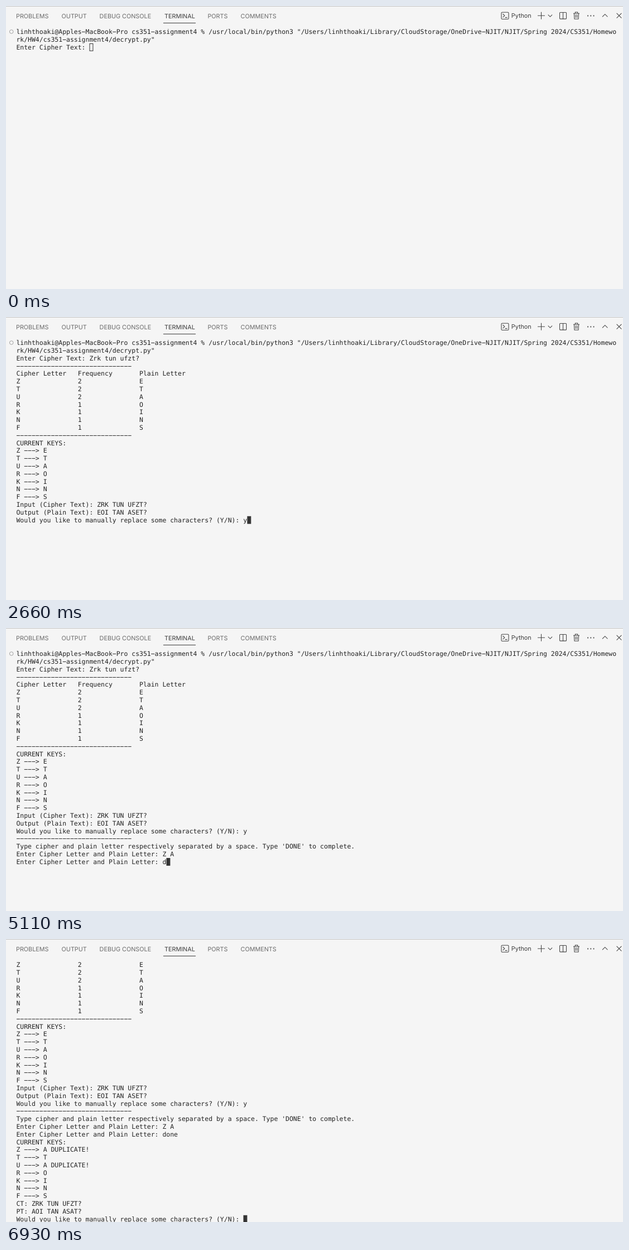
An HTML page for the animation above (8000 ms loop, 1106 by 507 pixels).

```html
<!DOCTYPE html>
<html lang="en">
<head>
<meta charset="utf-8">
<title>Terminal</title>
<style>
  html, body { margin: 0; width: 100%; height: 100%; overflow: hidden; background: #f5f5f5; }
  svg { display: block; width: 100%; height: 100%; }
  text { white-space: pre; text-rendering: geometricPrecision; }
  #tabs { font: 10.8px Inter, sans-serif; fill: #6a6a6a; }
  #tabs .active { fill: #3c3c3c; }
  #icons { fill: none; stroke: #484848; stroke-width: 1.1; }
  #rows { font: 11.46px "DejaVu Sans Mono", monospace; fill: #222; }
  #cursor { stroke: #333; }
</style>
</head>
<body>
<svg viewBox="0 0 1106 507">
  <rect width="1106" height="507" fill="#f5f5f5"/>
  <rect width="1106" height="1" fill="#c4c4c4"/>
  <g id="tabs">
    <text x="18" y="21.6">PROBLEMS</text>
    <text x="99.6" y="21.6">OUTPUT</text>
    <text x="167.6" y="21.6">DEBUG CONSOLE</text>
    <text x="284" y="21.6" class="active">TERMINAL</text>
    <text x="361.4" y="21.6">PORTS</text>
    <text x="420.6" y="21.6">COMMENTS</text>
    <text x="905.8" y="21.2" class="active">Python</text>
    <rect x="282" y="30" width="58" height="1" class="active"/>
  </g>
  <g id="icons">
    <rect x="888" y="11.3" width="13" height="12.2" rx="1.5"/>
    <path d="M890.6 14l3.2 3.2-3.2 3.2M894.5 20.6h4"/>
    <path d="M953 17.2h13M959.5 10.7v13"/>
    <path d="M971.7 15.6l3.7 3.7 3.7-3.7"/>
    <rect x="992.5" y="11.5" width="12" height="11.6" rx="1"/>
    <path d="M998.5 11.5v11.6"/>
    <path d="M1017 13.2h11M1020.4 13v-2h4.2v2M1018.4 13.4l.6 9.8h7l.6-9.8M1021.2 15.2v5.8M1023.8 15.2v5.8"/>
    <path d="M1069 19.4l4.7-4.7 4.7 4.7"/>
    <path d="M1094.6 12.8l8.8 8.8M1103.4 12.8l-8.8 8.8"/>
    <path d="M1042.2 17.5h1.8M1047.4 17.5h1.8M1052.6 17.5h1.8" stroke-width="1.8"/>
  </g>
  <circle id="marker" cx="9.7" cy="46" r="3.3" fill="none" stroke="#a0a0a0"/>
  <g id="rows"></g>
  <rect id="cursor"/>
</svg>
<script>
const LOOP = 8000, ROWS = 34;
const LEFT = 18.4, TOP = 39.4, CELL = 6.9, LINE = 13.8, BASELINE = 10.8;
const FOCUS_TIME = 280;

const rule = '-'.repeat(30);
const cipher = 'ZTURKNF';
const counts = '2221111';
const question = 'Would you like to manually replace some characters? (Y/N): ';
const prompt = 'Enter Cipher Letter and Plain Letter: ';

const letters = format => [...cipher].map(format).join('\n');
const table = letters((c, i) => c.padEnd(16) + counts[i].padEnd(16) + 'ETAOINS'[i]);
const keys = plain => 'CURRENT KEYS:\n' + letters((c, i) => {
  const duplicate = plain.split(plain[i]).length > 2;
  return `${c} ---> ${plain[i]}${duplicate ? ' DUPLICATE!' : ''}`;
});

// Each entry appends text to the terminal at the given time.
const output = [
  [0, 'linhthoaki@Apples-MacBook-Pro cs351-assignment4 % /usr/local/bin/python3 ' +
      '"/Users/linhthoaki/Library/CloudStorage/OneDrive-NJIT/NJIT/Spring 2024/CS351/Homewo\n' +
      'rk/HW4/cs351-assignment4/decrypt.py"\nEnter Cipher Text: '],
  [840, 'Zrk tun ufzt?'],
  [1400, ['', rule, 'Cipher Letter   Frequency       Plain Letter', table, rule, keys('ETAOINS'),
    'Input (Cipher Text): ZRK TUN UFZT?', 'Output (Plain Text): EOI TAN ASET?', question].join('\n')],
  [2660, 'y'],
  [2800, `\n${rule}\nType cipher and plain letter respectively separated by a space. Type 'DONE' to complete.\n${prompt}`],
  [3850, 'Z'],
  [4130, ' '],
  [4410, 'A'],
  [4690, '\n' + prompt],
  [5110, 'd'],
  [5180, 'o'],
  [5390, 'n'],
  [5600, 'e'],
  [5810, ['', keys('ATAOINS'), 'CT: ZRK TUN UFZT?', 'PT: AOI TAN ASAT?', question].join('\n')],
];

const byId = id => document.getElementById(id);
const setAttributes = (node, values) => {
  for (const name in values) node.setAttribute(name, values[name]);
};

const rows = Array.from({ length: ROWS }, (_, i) => {
  const row = document.createElementNS('http://www.w3.org/2000/svg', 'text');
  setAttributes(row, { x: LEFT, y: TOP + BASELINE + i * LINE });
  return byId('rows').appendChild(row);
});

function draw(time) {
  const lines = output.filter(([start]) => start <= time).map(([, text]) => text).join('').split('\n');
  const scroll = Math.max(0, lines.length - ROWS);
  // The minus sign has the wide dash of the terminal face.
  rows.forEach((row, i) => {
    row.textContent = (lines[i + scroll] || '').replaceAll('-', '\u2212');
  });
  byId('marker').style.display = scroll ? 'none' : '';

  const last = lines.length - 1;
  setAttributes(byId('cursor'), {
    x: LEFT + lines[last].length * CELL + 0.5,
    y: TOP + (last - scroll) * LINE + 0.5,
    width: CELL - 1,
    height: LINE - 1,
    fill: time < FOCUS_TIME ? 'none' : '#333',
  });
}

let shown = -1;
function tick() {
  const time = performance.now() % LOOP;
  const step = output.filter(([start]) => start <= time).length + (time >= FOCUS_TIME);
  if (step !== shown) draw(time);
  shown = step;
  requestAnimationFrame(tick);
}
tick();
</script>
</body>
</html>
```
